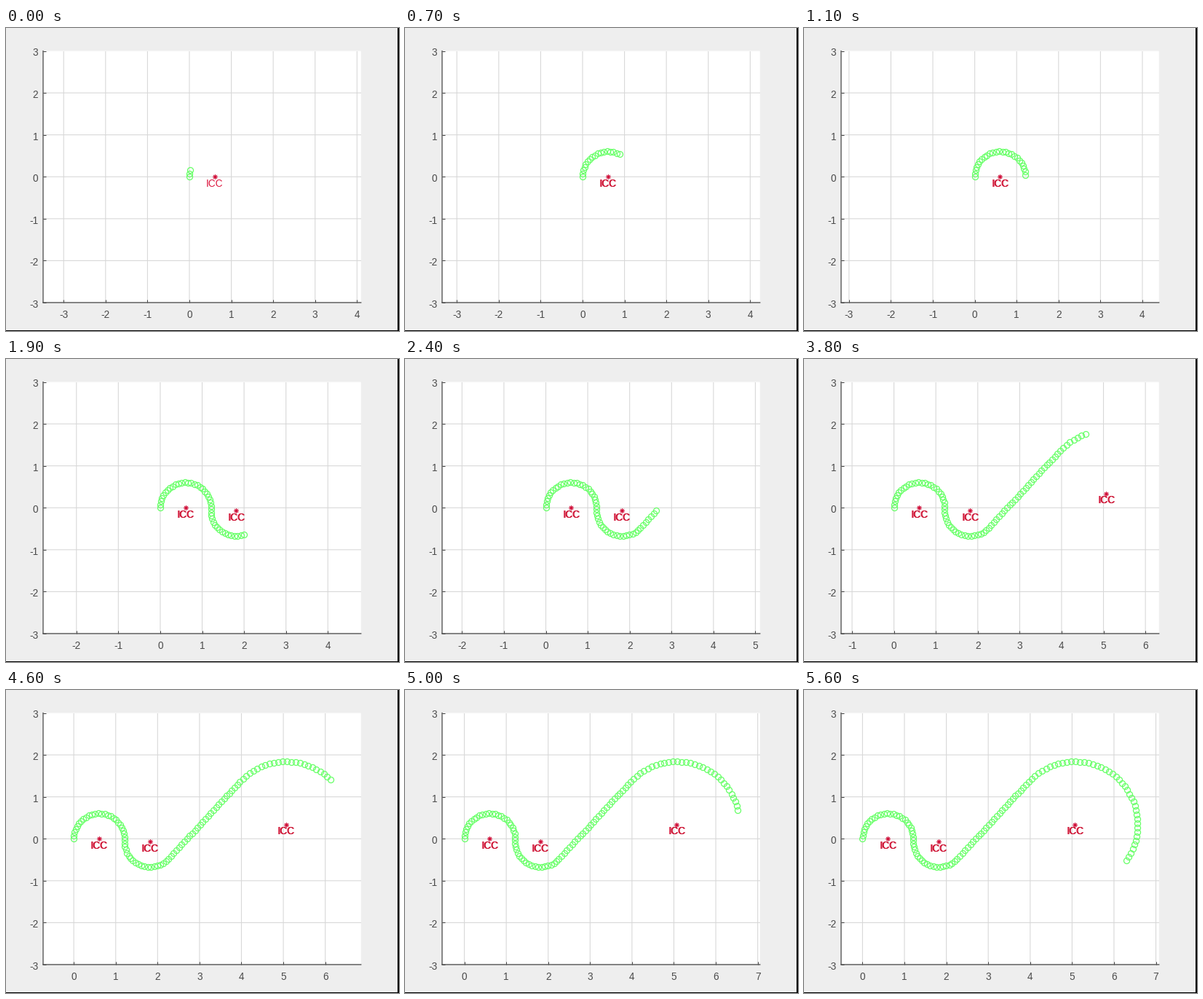
A matplotlib script for the animation above (5.7 s loop, 540x416 px).

```python
import numpy as np
import matplotlib.pyplot as plt
from matplotlib.animation import FuncAnimation
from matplotlib.patches import Rectangle
from matplotlib.ticker import MultipleLocator
from matplotlib.transforms import ScaledTranslation

W, H, DPI = 540, 416, 100
FRAMES, INTERVAL = 57, 100
PX = 72 / DPI  # one pixel in points
LEFT, RIGHT, TOP, BOTTOM = 51, 487.8, 31.5, 377
HALF_SPAN = 3 * (RIGHT - LEFT) / (BOTTOM - TOP)

plt.rcParams.update({
    "font.family": "Liberation Sans",
    "font.size": 13.6 * PX,
    "axes.unicode_minus": False,
    "path.snap": False,
})

# Legs of the drive: steps, turn per step in degrees, radius or step length
LEGS = [
    (25, -7.33, 0.605),
    (19, 7.39, 0.605),
    (27, 0, 0.093),
    (44, -4.0, 1.5),
]


def drive():
    """Return the robot's positions and a (first step, x, y) per turning centre."""
    pos, heading = np.zeros(2), np.pi / 2
    path, centres = [pos], []
    for steps, turn, size in LEGS:
        if turn == 0:
            delta = size * np.array([np.cos(heading), np.sin(heading)])
            path += [pos + delta * i for i in range(1, steps + 1)]
        else:
            side = np.sign(turn)
            normal = side * np.array([-np.sin(heading), np.cos(heading)])
            centre = pos + size * normal
            centres.append((len(path), *centre))
            for i in range(1, steps + 1):
                a = heading + np.radians(turn) * i
                path.append(centre - side * size * np.array([-np.sin(a), np.cos(a)]))
            heading += np.radians(turn) * steps
        pos = path[-1]
    return np.array(path), centres


path, centres = drive()

fig = plt.figure(figsize=(W / DPI, H / DPI), dpi=DPI, facecolor="#eeeeee")
ax = fig.add_axes([LEFT / W, 1 - BOTTOM / H, (RIGHT - LEFT) / W, (BOTTOM - TOP) / H])
ax.set_ylim(-3, 3)
ax.xaxis.set_major_locator(MultipleLocator(1))
ax.yaxis.set_major_locator(MultipleLocator(1))
ax.set_axisbelow(True)
ax.grid(color="#d8d8d8", linewidth=1.1 * PX)
ax.tick_params(direction="in", length=4 * PX, width=PX, color="#404040",
               labelcolor="#4a4a4a")
ax.tick_params(axis="x", pad=9.6 * PX)
ax.tick_params(axis="y", pad=6.8 * PX)
for side in ("top", "right"):
    ax.spines[side].set_visible(False)
for side in ("left", "bottom"):
    ax.spines[side].set(color="#404040", linewidth=1.2 * PX)

drop = ScaledTranslation(0, -1.5 / DPI, fig.dpi_scale_trans)
for tick_label in ax.get_yticklabels():
    tick_label.set_transform(tick_label.get_transform() + drop)

# Black rim of the window
for corner, w, h in (((1 - 2 / W, 0), 2 / W, 1), ((0, 0), 1, 1 / H)):
    fig.add_artist(Rectangle(corner, w, h, color="black", linewidth=0,
                             transform=fig.transFigure))

trail, = ax.plot([], [], "o", markersize=8 * PX, markerfacecolor="none",
                 markeredgecolor="#66ff66", markeredgewidth=1.25 * PX)
stars, = ax.plot([], [], linestyle="none", marker=(8, 2, 0), markersize=7 * PX,
                 markeredgecolor="#d0103a", markeredgewidth=0.9 * PX)
for marks in (trail, stars):
    marks.set_snap(False)


def label(x, y, dx, color):
    return ax.annotate("ICC", (x, y), xytext=(dx * PX, -13.5 * PX),
                       textcoords="offset points", ha="center", va="baseline",
                       color=color, annotation_clip=False)


# A second label overprints the first, one pixel aside, as the turn goes on
labels = []
for start, x, y in centres:
    labels.append((start, label(x, y, 0, "#dc143c")))
    labels.append((start + 3, label(x, y, 1, "#c8102e")))


def update(k):
    n = min(2 * k + 2, len(path) - 1)
    shown = path[:n + 1]
    pivots = np.array([(x, y) for start, x, y in centres if n >= start])
    trail.set_data(shown[:, 0], shown[:, 1])
    stars.set_data(pivots[:, 0], pivots[:, 1])
    for first, text in labels:
        text.set_visible(n >= first)
    mid = max(shown[:, 0].max(), pivots[:, 0].max()) / 2
    ax.set_xlim(mid - HALF_SPAN, mid + HALF_SPAN)
    return trail, stars


anim = FuncAnimation(fig, update, frames=FRAMES, interval=INTERVAL,
                     repeat=True, repeat_delay=0, blit=False)
plt.show()
```
